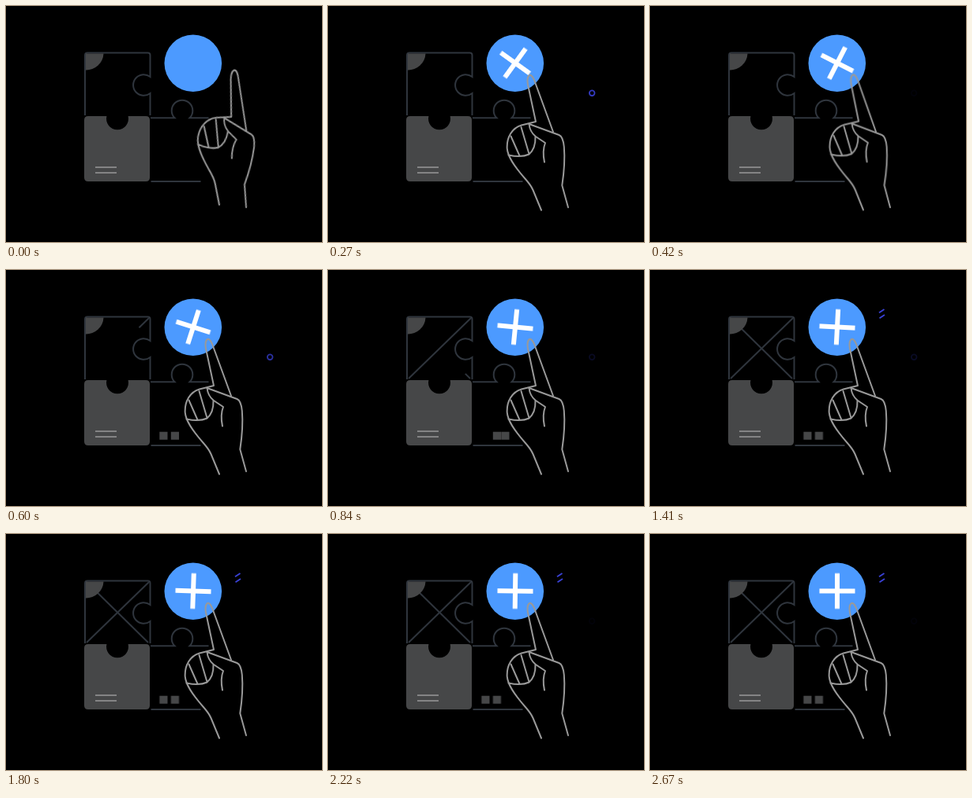
An HTML page for the animation above (2730 ms loop, 400 by 300 pixels).

```html
<!DOCTYPE html>
<html lang="en">
<head>
<meta charset="utf-8">
<title>Puzzle tap</title>
<style>
  html, body { margin: 0; width: 100%; height: 100%; overflow: hidden; background: #000; }
  svg { display: block; width: 100%; height: 100%; }

  .line { fill: none; stroke: #2f353d; stroke-width: 2; }
  .solid { fill: #464748; }
  .text { stroke: #999; stroke-width: 1.6; }
  .accent { fill: none; stroke: #3a42d8; stroke-width: 1.8; }
  .hand { fill: none; stroke: #999; stroke-width: 2; stroke-linecap: round; stroke-linejoin: round; }

  .hand, .plus, .draw, .sq { animation: 2730ms linear infinite both; }
  .draw { stroke-dasharray: 1 2; }

  .hand { animation-name: tap; transform-origin: 304.5px 256px; }
  @keyframes tap {
    0% { transform: rotate(11.3deg); animation-timing-function: ease-in-out; }
    9.2%, 10.2% { transform: rotate(0deg); }
    15.4% { transform: rotate(.6deg); }
    19.8%, 100% { transform: rotate(0deg); }
  }

  .plus { animation-name: spin; transform-origin: 0 0; }
  @keyframes spin {
    0%, 5.5% { transform: rotate(45deg) scale(0); }
    9.5% { transform: rotate(36.5deg) scale(1); }
    15.4% { transform: rotate(27deg) scale(1); }
    30.8% { transform: rotate(5.5deg) scale(1); }
    51.6% { transform: rotate(3deg) scale(1); }
    81.3% { transform: rotate(.8deg) scale(1); }
    100% { transform: rotate(0deg) scale(1); }
  }

  .d1 { animation-name: draw1; }
  .d2 { animation-name: draw2; }
  .dash { animation-name: draw3; }
  @keyframes draw1 {
    0%, 20.5% { stroke-dashoffset: 1; opacity: 0; }
    20.6% { stroke-dashoffset: 1; opacity: 1; }
    29.5%, 100% { stroke-dashoffset: 0; opacity: 1; }
  }
  @keyframes draw2 {
    0%, 30% { stroke-dashoffset: 1; opacity: 0; }
    30.1% { stroke-dashoffset: 1; opacity: 1; }
    39%, 100% { stroke-dashoffset: 0; opacity: 1; }
  }
  @keyframes draw3 {
    0%, 33% { stroke-dashoffset: 1; opacity: 0; }
    33.1% { stroke-dashoffset: 1; opacity: 1; }
    39%, 100% { stroke-dashoffset: 0; opacity: 1; }
  }

  .s1 { animation-name: hop; }
  .s2 { animation-name: slide; }
  @keyframes hop {
    0%, 18.6% { transform: translateX(0); opacity: 0; }
    19.8%, 22% { transform: translateX(0); opacity: 1; animation-timing-function: ease-in-out; }
    30%, 31.5% { transform: translateX(25px); opacity: 1; animation-timing-function: ease-in-out; }
    39%, 100% { transform: translateX(14.5px); opacity: 1; }
  }
  @keyframes slide {
    0%, 20.5% { transform: translateX(0); opacity: 0; }
    22%, 31.5% { transform: translateX(0); opacity: 1; animation-timing-function: ease-in-out; }
    39%, 100% { transform: translateX(-14.5px); opacity: 1; }
  }
</style>
</head>
<body>
<svg viewBox="0 0 400 300">
  <g class="line">
    <path class="draw d1" pathLength="1" d="M181 61L102 138"/>
    <path class="draw d2" pathLength="1" d="M180 138L102 61"/>
    <path d="M100 139V62.500Q100 59.500 103 59.500H179.500Q182.500 59.500 182.500 62.500V90A13.300 13.300 0 1 0 182.500 111V139"/>
    <path d="M183 142.300H213.500A13.300 13.300 0 1 1 232.500 142.300H256.500M183.500 223H246.500"/>
  </g>

  <path class="solid" d="M101 60.500H123.500A22 22 0 0 1 101 81.500Z"/>
  <path class="solid" d="M104 140H127.400A14 14 0 1 0 154.600 140H177Q182 140 182 145V218Q182 223 177 223H104Q99 223 99 218V145Q99 140 104 140Z"/>
  <path class="text" d="M113 205H140M113 212H140"/>

  <rect class="solid sq s1" x="194.300" y="205.700" width="10.200" height="10"/>
  <rect class="solid sq s2" x="208.800" y="205.700" width="10.200" height="10"/>

  <circle cx="236.800" cy="72.800" r="36.300" fill="#4c9aff"/>
  <g transform="translate(237 72.500)">
    <path class="plus" d="M-22.500 0H22.500M0 -22.500V22.500" stroke="#fff" stroke-width="6"/>
  </g>

  <g class="accent">
    <path class="draw dash" pathLength="1" d="M290 54.300L296.500 50"/>
    <path class="draw dash" pathLength="1" d="M290.500 61.300L297 57"/>
    <circle id="ring" cx="334.200" cy="110.700" r="3.300"/>
  </g>

  <g class="hand">
    <path d="M270 259.500L259.500 234Q257 228 249.500 219.500C236 204 227.500 192 226.700 181C226 167 233 155 245 151.500L263 147L253 100C251 88 256.500 83 261 94L285 160"/>
    <path d="M254.500 150L292.500 164Q297.500 166 298.800 179Q300.500 200 296.300 228L304 256"/>
    <path d="M254.500 150Q255.500 160 263 166L275 174Q271 184 274 198.500"/>
    <path d="M228.500 189.500Q245 193 254.500 188.500Q263 181 262.500 166M231.500 165.500L242.500 190.500M244.500 154L254.500 188"/>
  </g>
</svg>
<script>
  // Ring pulse: 450 ms waves, restarted with every loop.
  const loop = 2730, step = 30, wave = 450;
  const pulse = Array.from({ length: loop / step + 1 }, (_, i) => ({
    opacity: Math.sin(Math.PI * i * step / wave) ** 2
  }));
  const ring = document.getElementById("ring").animate(pulse, { duration: loop, iterations: Infinity });
  // Share one start time between the scripted and the CSS animations.
  ring.ready.then(() => document.getAnimations().forEach(a => { a.startTime = ring.startTime; }));
</script>
</body>
</html>
```
